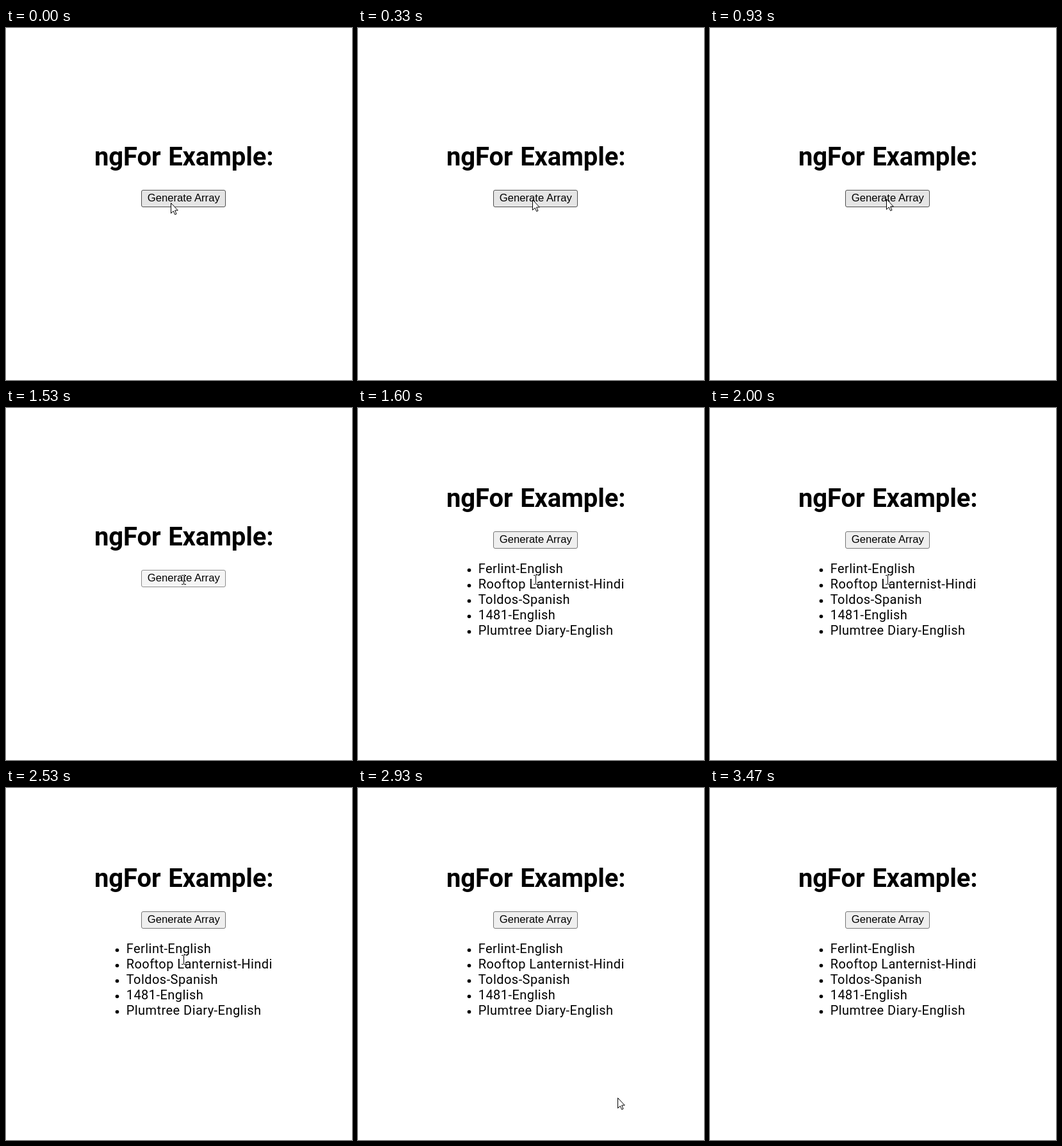
An HTML page that plays this animation: 540x548 px, repeating every 3590 ms.

```html
<!DOCTYPE html>
<html lang="en">
<head>
<meta charset="utf-8">
<title>ngFor Example</title>
<style>
  html, body { margin: 0; width: 100%; height: 100%; overflow: hidden; background: #fff; }
  svg { display: block; width: 540px; height: 548px; }
  .title { font: 700 40px Roboto, sans-serif; letter-spacing: -.1px; word-spacing: 1.8px; }
  .item { font: 400 20px Roboto, sans-serif; letter-spacing: .45px; }
  .label { font: 16.667px "Liberation Sans", Arial, sans-serif; text-anchor: middle; }
  #beam { fill: none; stroke: #fff; mix-blend-mode: difference; }
</style>
</head>
<body>
<svg viewBox="0 0 540 548">
  <rect width="540" height="548" fill="#fff"/>
  <g id="head">
    <text class="title" x="138" y="214">ngFor Example:</text>
    <rect id="button" x="211.5" y="252.5" width="131" height="26" rx="2.5"/>
    <text class="label" x="277.3" y="270">Generate Array</text>
  </g>
  <g id="list"></g>
  <path id="beam" d="M274 260.5h3m1 0h3M277.5 261v13M274 274.5h3m1 0h3"/>
  <path id="arrow" d="M.5.5V16.5L4.2 13L6.7 18.5L9 17.5L6.6 12H11.3Z" fill="#fff" stroke="#000"/>
</svg>
<script>
const LOOP = 3590, STEP = 200 / 3;
const PRESS = 1330, BEAM = 1530, SHOW = 1600, LEAVE = 2600, GONE = 3200;

const items = [
  "Ferlint-English",
  "Rooftop Lanternist-Hindi",
  "Toldos-Spanish",
  "1481-English",
  "Plumtree Diary-English"
];

// Pointer stops: time, x, y
const route = [
  [0, 257, 272], [400, 275, 266], [LEAVE, 275, 266],
  [2670, 285, 280], [2800, 342, 378], [2930, 405, 482], [3130, 453, 535]
];

const $ = id => document.getElementById(id);
const show = (el, on) => el.setAttribute("visibility", on ? "visible" : "hidden");

$("list").innerHTML = items.map((name, i) => {
  const y = 257 + 24 * i;
  return `<circle cx="173.5" cy="${y - 4.5}" r="2.8"/><text class="item" x="187.7" y="${y}">${name}</text>`;
}).join("");

function pointer(t) {
  const i = route.findIndex(p => p[0] > t);
  if (i < 0) return route[route.length - 1].slice(1);
  const [t0, x0, y0] = route[i - 1], [t1, x1, y1] = route[i];
  const k = (t - t0) / (t1 - t0);
  return [x0 + (x1 - x0) * k, y0 + (y1 - y0) * k].map(Math.round);
}

function buttonColors(t) {
  if (t < PRESS) return ["#e5e5e5", "#4f4f4f"];
  return t < SHOW ? ["#f5f5f5", "#8d8d8d"] : ["#efefef", "#767676"];
}

// The screen refreshes fifteen times a second, on whole hundredths
const refresh = time => Math.round(Math.floor((time + 4) / STEP) * STEP / 10) * 10;

function draw(time) {
  const t = refresh(time);
  const [fill, stroke] = buttonColors(t);
  $("button").setAttribute("fill", fill);
  $("button").setAttribute("stroke", stroke);
  $("head").setAttribute("transform", `translate(0 ${t < SHOW ? 0 : -60})`);
  show($("list"), t >= SHOW);

  const beam = t >= BEAM && t < LEAVE;
  show($("beam"), beam);
  show($("arrow"), !beam && t < GONE);
  $("arrow").setAttribute("transform", `translate(${pointer(t)})`);
}

const start = performance.now();
function tick() {
  draw((performance.now() - start) % LOOP);
  requestAnimationFrame(tick);
}
tick();
</script>
</body>
</html>
```
